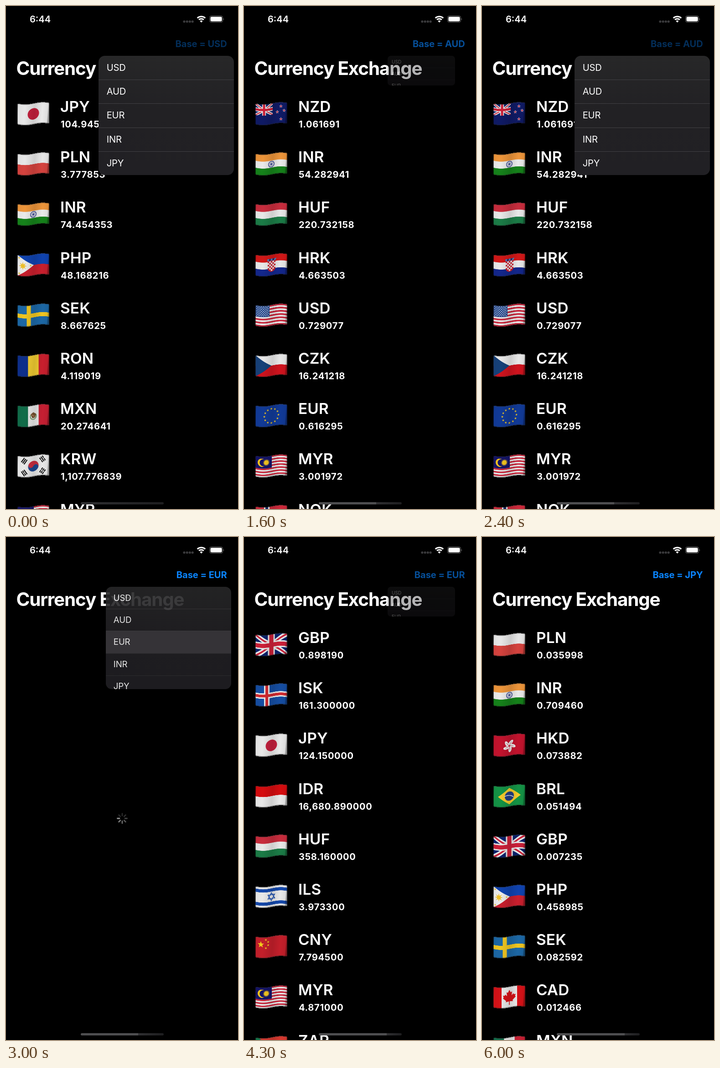
An HTML page with a canvas that plays this animation: 509 px wide and 1101 px high, repeating every 6.1 s.

```html
<!DOCTYPE html>
<html lang="en">
<head>
<meta charset="utf-8">
<title>Currency Exchange</title>
<style>
  html, body { margin: 0; width: 509px; height: 1101px; overflow: hidden; background: #000; }
  #stage {
    position: relative; width: 509px; height: 1101px; overflow: hidden;
    background: #000; color: #fff; font-family: Inter, sans-serif;
  }
  #stage div, canvas, svg { position: absolute; white-space: nowrap; }
  #time { left: 35px; width: 80px; top: 19px; font: 600 20.2px/20px Inter, sans-serif; text-align: center; }
  #base { right: 24.4px; top: 72.5px; font: 700 20.2px/20px Inter, sans-serif; letter-spacing: -.006em; color: #0a84ff; }
  #title { left: 22.5px; top: 117px; font: 700 40.4px/40px Inter, sans-serif; letter-spacing: -.0285em; }
  .list { inset: 0; }
  .row { left: 0; width: 509px; height: 110px; }
  .row canvas { left: 25px; top: 0; }
  .code { left: 119px; top: -8px; font: 600 33.3px/37px Inter, sans-serif; letter-spacing: .005em; }
  .rate { left: 120px; top: 38px; font: 700 20.2px/21px Inter, sans-serif; letter-spacing: .03em; }
  #menu { top: 109px; overflow: hidden; border-radius: 14px; background: linear-gradient(#272728, #222124 45%, #212024); }
  #items { left: 0; top: 0; width: 297px; height: 261px; transform-origin: 0 0; }
  .item {
    left: 0; width: 279px; height: 52.2px; padding-left: 18.2px;
    font: 400 20.2px/52.2px Inter, sans-serif; letter-spacing: -.01em;
  }
  .item + .item { box-shadow: inset 0 1px #414044; }
  .item.on { background: #3b393d; }
  #home { left: 164px; top: 1086px; width: 182px; height: 5px; border-radius: 3px; }
</style>
</head>
<body>
<div id="stage">
  <div id="time">6:44</div>
  <svg width="509" height="60" style="left:0;top:0">
    <g fill="#3a3a3c">
      <circle cx="391" cy="34" r="2.6"/><circle cx="397.2" cy="34" r="2.6"/>
      <circle cx="403.3" cy="34" r="2.6"/><circle cx="409.2" cy="34" r="2.6"/>
    </g>
    <g fill="none" stroke="#fff" stroke-width="3">
      <path d="M419.8 26.3a13 13 0 0 1 17.4 0"/>
      <path d="M423.1 30a8 8 0 0 1 10.8 0"/>
    </g>
    <path d="M428.5 36.3l-3-3.3a4.4 4.4 0 0 1 6 0z" fill="#fff"/>
    <rect x="446.6" y="21.6" width="29" height="14" rx="4" fill="none" stroke="#777"/>
    <rect x="448.5" y="23.5" width="25.2" height="10.2" rx="2.4" fill="#fff"/>
    <path d="M477.2 26.4q1.8 2.2 0 4.4z" fill="#888"/>
  </svg>
  <div id="title">Currency Exchange</div>
  <svg id="spin" width="30" height="30" viewBox="-15 -15 30 30" style="left:239.5px;top:600.5px"></svg>
  <div id="base"></div>
  <div id="menu"><div id="items"></div></div>
  <div id="home"></div>
</div>
<script>
const $ = id => document.getElementById(id);
const W = 70, H = 46, MID = H / 2, TAU = Math.PI * 2;

const lists = {
  USD: 'JPY 104.945|PLN 3.777853|INR 74.454353|PHP 48.168216|SEK 8.667625|RON 4.119019|MXN 20.274641|KRW 1,107.776839|MYR ',
  AUD: 'NZD 1.061691|INR 54.282941|HUF 220.732158|HRK 4.663503|USD 0.729077|CZK 16.241218|EUR 0.616295|MYR 3.001972|NOK ',
  EUR: 'GBP 0.898190|ISK 161.300000|JPY 124.150000|IDR 16,680.890000|HUF 358.160000|ILS 3.973300|CNY 7.794500|MYR 4.871000|ZAR ',
  JPY: 'PLN 0.035998|INR 0.709460|HKD 0.073882|BRL 0.051494|GBP 0.007235|PHP 0.458985|SEK 0.082592|CAD 0.012466|MXN '
};

// Flag drawing, on a flat W x H field
let g;
const rect = (c, x = 0, y = 0, w = W, h = H) => { g.fillStyle = c; g.fillRect(x, y, w, h); };
const rows = (...cs) => cs.forEach((c, i) => rect(c, 0, i * H / cs.length, W, H / cs.length + .2));
const cols = (...cs) => cs.forEach((c, i) => rect(c, i * W / cs.length, 0, W / cs.length + .2, H));
const disc = (c, x, y, r, a = 0, b = TAU) => { g.fillStyle = c; g.beginPath(); g.arc(x, y, r, a, b); g.fill(); };
const ring = (c, x, y, r, w) => { g.strokeStyle = c; g.lineWidth = w; g.beginPath(); g.arc(x, y, r, 0, TAU); g.stroke(); };
const path = pts => { g.beginPath(); pts.forEach(p => g.lineTo(...p)); g.closePath(); };
const poly = (c, ...pts) => { g.fillStyle = c; path(pts); g.fill(); };
const line = (c, w, x, y, x2, y2) => {
  g.strokeStyle = c; g.lineWidth = w;
  g.beginPath(); g.moveTo(x, y); g.lineTo(x2, y2); g.stroke();
};
const around = (n, x, y, r, turn = -Math.PI / 2) => Array.from({ length: n }, (_, i) =>
  [x + r * Math.cos(turn + i * TAU / n), y + r * Math.sin(turn + i * TAU / n)]);
const star = (c, x, y, r, n = 5, k = .4) => {
  const tips = around(n, x, y, r), dents = around(n, x, y, r * k, -Math.PI / 2 + Math.PI / n);
  poly(c, ...tips.flatMap((p, i) => [p, dents[i]]));
};
const cross = (c, x, w) => { rect(c, x - w / 2, 0, w, H); rect(c, 0, (H - w) / 2, W, w); };
const nordic = (bg, outer, inner) => { rect(bg); cross(outer, 25, inner ? 12 : 9); if (inner) cross(inner, 25, 6); };
const union = (w, h) => {
  g.save(); g.beginPath(); g.rect(0, 0, w, h); g.clip();
  rect('#0b2370', 0, 0, w, h);
  for (const [c, k] of [['#eee', .22], ['#d2213a', .075]]) {
    line(c, h * k, 0, 0, w, h); line(c, h * k, w, 0, 0, h);
  }
  for (const [c, k] of [['#eee', .33], ['#d2213a', .2]]) {
    rect(c, w / 2 - h * k / 2, 0, h * k, h); rect(c, 0, h / 2 - h * k / 2, w, h * k);
  }
  g.restore();
};
const stripes = n => { for (let i = 0; i < n; i++) rect(i % 2 ? '#f2f2f2' : '#d02a40', 0, i * H / n, W, H / n + .1); };

const flags = {
  JPY() { rect('#f0f0f0'); disc('#c9213f', 35, MID, 12.5); },
  PLN() { rows('#efefef', '#dc4540'); },
  IDR() { rows('#dc0d10', '#f0f0f0'); },
  INR() {
    rows('#f59a3c', '#f2f2f2', '#16861b');
    ring('#26348c', 35, MID, 6.3, 1.2);
    for (const p of around(12, 35, MID, 6)) line('#5863a8', .6, 35, MID, ...p);
    disc('#26348c', 35, MID, 1.5);
  },
  PHP() {
    rows('#1045b5', '#d0202f');
    poly('#f2f2f2', [0, 0], [36, MID], [0, H]);
    star('#f5c52c', 12, MID, 9, 8, .42);
    for (const [x, y] of [[4, 6], [4, H - 6], [29, MID]]) star('#f5c52c', x, y, 2.6);
  },
  SEK() { nordic('#1d6bab', '#f7cc22'); },
  RON() { cols('#0f3190', '#f9d233', '#cf202f'); },
  MXN() {
    cols('#12704c', '#f0f0f0', '#cc2034');
    ring('#6f9a65', 35, 24, 6.5, 1.8);
    poly('#7a5433', [29, 19], [35, 15], [41, 20], [39, 27], [33, 28]);
    line('#b58b5f', 1.5, 31, 20, 38, 25);
  },
  KRW() {
    rect('#f0f0f0');
    g.save(); g.translate(35, MID); g.rotate(.5);
    disc('#cf2f42', 0, 0, 11.5, Math.PI, TAU); disc('#1d4a94', 0, 0, 11.5, 0, Math.PI);
    disc('#cf2f42', -5.75, 0, 5.75); disc('#1d4a94', 5.75, 0, 5.75);
    g.restore();
    [[15, 10, -1, 0], [55, 10, 1, 2], [15, 36, 1, 1], [55, 36, -1, 3]].forEach(([x, y, d, gap]) => {
      g.save(); g.translate(x, y); g.rotate(d * .95);
      for (let i = -1; i < 2; i++) {
        rect('#111', -6, i * 3.6 - 1.1, 12, 2.2);
        if (gap == 3 || gap == 2 && i || gap == 1 && !i) rect('#f0f0f0', -.6, i * 3.6 - 1.4, 1.2, 2.8);
      }
      g.restore();
    });
  },
  MYR() {
    stripes(14); rect('#14146b', 0, 0, 36, H * 8 / 14);
    disc('#fccc20', 14, 13.5, 9); disc('#14146b', 17, 13.5, 7.6);
    star('#fccc20', 24, 13.5, 8, 14, .55);
  },
  NZD() {
    rect('#101b68'); union(38, 25);
    for (const [x, y] of [[56, 9], [48, 21], [63, 18], [56, 37]]) { star('#f0f0f0', x, y, 4.2); star('#d2213a', x, y, 2.8); }
  },
  HUF() { rows('#cf2e3f', '#f0f0f0', '#1c8049'); },
  HRK() {
    rows('#d81818', '#f0f0f0', '#142890');
    rect('#d02030', 27, 14, 17, 15); disc('#d02030', 35.5, 29, 8.5, 0, Math.PI);
    for (let i = 0; i < 5; i++) for (let j = 0; j < 6; j++)
      if ((i + j) % 2 && !(j == 5 && i % 4 == 0)) rect('#f4f4f4', 27 + i * 3.4, 14 + j * 3.6, 3.4, 3.6);
    for (let i = 0; i < 5; i++) poly(i % 2 ? '#16337f' : '#3d8fd0', [26 + i * 4, 9], [30 + i * 4, 9], [29 + i * 3.5, 14], [27 + i * 3.5, 14]);
  },
  USD() {
    stripes(13); rect('#284d93', 0, 0, 31, H * 7 / 13);
    for (let r = 0; r < 9; r++) for (let c = 0; c < 6 - r % 2; c++)
      star('#fff', 3 + c * 5 + r % 2 * 2.5, 2.6 + r * 2.45, 1.4);
  },
  CZK() { rows('#f0f0f0', '#d7141f'); poly('#17437d', [0, 0], [35, MID], [0, H]); },
  EUR() { rect('#123c9c'); for (const p of around(12, 35, MID, 15.5)) star('#f8cb25', ...p, 2.7); },
  NOK() { nordic('#d52a3c', '#f0f0f0', '#12296b'); },
  GBP() { union(W, H); },
  ISK() { nordic('#1650a8', '#f0f0f0', '#d92c32'); },
  ILS() {
    rect('#f0f0f0'); rect('#164bb0', 0, 5, W, 7); rect('#164bb0', 0, H - 12, W, 7);
    g.strokeStyle = '#164bb0'; g.lineWidth = 1.5;
    for (const a of [-1, 1]) { path(around(3, 35, MID, 8.5, a * Math.PI / 2)); g.stroke(); }
  },
  CNY() {
    rect('#c9202c'); star('#fbd51e', 12, 16, 7.5);
    for (const [x, y] of [[23, 6], [28, 11], [28, 18], [23, 24]]) star('#fbd51e', x, y, 2.8);
  },
  ZAR() {
    rows('#de3a30', '#102a8c'); rect('#eee', 0, 15, W, 16); rect('#137a4c', 0, 19, W, 8);
    poly('#137a4c', [0, 0], [8, 0], [38, MID], [8, H], [0, H]);
    poly('#f7b52a', [0, 7], [22, MID], [0, H - 7]); poly('#111', [0, 11], [17, MID], [0, H - 11]);
  },
  HKD() {
    rect('#c9142f');
    for (let i = 0; i < 5; i++) {
      g.save(); g.translate(35, 24); g.rotate(i * TAU / 5 + .3);
      g.fillStyle = '#f2f2f2'; g.beginPath(); g.ellipse(1, -7.5, 3.4, 6.6, .5, 0, TAU); g.fill();
      line('#c9142f', .7, 0, -2, 2, -9);
      g.restore();
    }
  },
  BRL() {
    rect('#159848'); poly('#fbd02c', [35, 5], [60, MID], [35, H - 5], [10, MID]);
    disc('#243f87', 35, MID, 10);
    g.strokeStyle = '#eee'; g.lineWidth = 1.5;
    g.beginPath(); g.arc(31, 39.5, 18.5, -1.95, -.82); g.stroke();
  },
  CAD() {
    rect('#f0f0f0'); rect('#dc1218', 0, 0, 18, H); rect('#dc1218', 52, 0, 18, H);
    const half = [[0, -17], [3, -11], [6, -12.5], [5, -4], [9, -8], [10, -5.5], [14, -6], [12.5, -2], [14, 0], [7, 6.5], [8, 9], [.8, 8.2], [.8, 16]];
    const at = s => ([x, y]) => [35 + s * x, 24 + y];
    poly('#dc1218', ...half.map(at(1)), ...half.map(at(-1)).reverse());
  }
};

function canvas(w, h) {
  const c = document.createElement('canvas');
  c.width = w; c.height = h;
  return c;
}

function flag(code) {
  const flat = canvas(W * 2, H * 2), out = canvas(W, 52);
  g = flat.getContext('2d');
  g.scale(2, 2);
  g.beginPath(); g.roundRect(.4, 0, W - .8, H, 2); g.clip();
  flags[code]();
  const shade = g.createLinearGradient(0, 0, W, 6);
  [.4, .06, .03, .14, .03, .08, .4].forEach((a, i) => shade.addColorStop([0, .04, .25, .55, .8, .96, 1][i], `rgba(0,0,0,${a})`));
  rect(shade);
  rect('rgba(50,50,50,.45)', 0, 0, W, 1.3);
  rect('rgba(30,30,30,.45)', 0, H - 1.7, W, 1.7);
  const o = out.getContext('2d');
  for (let x = 0; x < W; x++)
    o.drawImage(flat, x * 2, 0, 2, H * 2, x, 2.8 + 2.5 * Math.sin((x + 3) / 78 * TAU), 1, H);
  return out;
}

function add(parent, cls, text = '') {
  const d = document.createElement('div');
  d.className = cls; d.textContent = text;
  parent.append(d);
  return d;
}

const views = {};
for (const name in lists) {
  const view = views[name] = add($('stage'), 'list');
  $('stage').insertBefore(view, $('base'));
  lists[name].split('|').forEach((entry, i) => {
    const [code, rate] = entry.split(' '), row = add(view, 'row');
    row.style.top = 210 + i * 110.2 + 'px';
    row.append(flag(code));
    add(row, 'code', code);
    add(row, 'rate', rate);
  });
}

const items = ['USD', 'AUD', 'EUR', 'INR', 'JPY'].map((name, i) => {
  const d = add($('items'), 'item', name);
  d.style.top = i * 52.2 + 'px';
  return d;
});

$('spin').innerHTML = Array.from({ length: 8 }, (_, i) =>
  `<path d="M-6 0h-4.5" stroke="#999" stroke-width="2.8" stroke-linecap="round"
    opacity="${Math.max(.27, .95 - i * .13)}" transform="rotate(${-45 * i})"/>`).join('');

const LOOP = 6100, STEP = 100;
const picks = [
  { at: -1e4, ready: -1e4, name: 'USD' },
  { at: 500, ready: 800, name: 'AUD' },
  { at: 3000, ready: 3400, name: 'EUR' },
  { at: 5700, ready: 6000, name: 'JPY' }
];
// start: [menu scale, button opacity] for each step; the last one holds
const opening = [[0, .7], [0, .45], [.5, .4], [.95, .35], [1, .35]];
const closing = [[.926, 1], [.5, 1], [0, 1]];
const runs = [
  [0, [[1, .35]]],
  [500, closing],
  [1400, [[0, .6], [.9, .4], [.5, .6], [0, .85], [0, 1]]],
  [2000, opening],
  [3000, closing],
  [3900, [[0, 1], [.5, .45], [1, .35], [.926, .4], [.5, .6], [0, 1]]],
  [4700, opening],
  [5700, closing]
];

function draw(t) {
  const pick = picks.findLast(p => p.at <= t);
  const [start, steps] = runs.findLast(r => r[0] <= t);
  const [s, dim] = steps[Math.min((t - start) / STEP, steps.length - 1)];
  const loading = t < pick.ready;

  for (const name in views) views[name].style.display = !loading && name == pick.name ? '' : 'none';
  $('spin').style.display = loading ? '' : 'none';
  $('spin').style.transform = `rotate(${(t - pick.at) / STEP * 45}deg)`;
  $('base').textContent = 'Base = ' + pick.name;
  $('base').style.opacity = dim;

  const m = $('menu').style;
  m.display = s ? '' : 'none';
  m.left = 427 - 224.5 * s + 'px';
  m.width = 297 * s + 'px';
  m.height = 261 * s * s + 'px';
  m.opacity = (s - .25) / .75;
  m.borderRadius = 14 * s + 'px';
  $('items').style.transform = `scale(${s})`;
  items.forEach(d => d.classList.toggle('on', start == pick.at && d.textContent == pick.name));

  const split = t < 500 ? 0 : t < 3400 ? 69 : 82;
  $('home').style.background = `linear-gradient(90deg, #4e4e50 ${split}%, #303032 ${split}%, #1d1d1f)`;
}

const t0 = performance.now();
(function tick() {
  draw(Math.floor((performance.now() - t0) % LOOP / STEP) * STEP);
  requestAnimationFrame(tick);
})();
</script>
</body>
</html>
```
